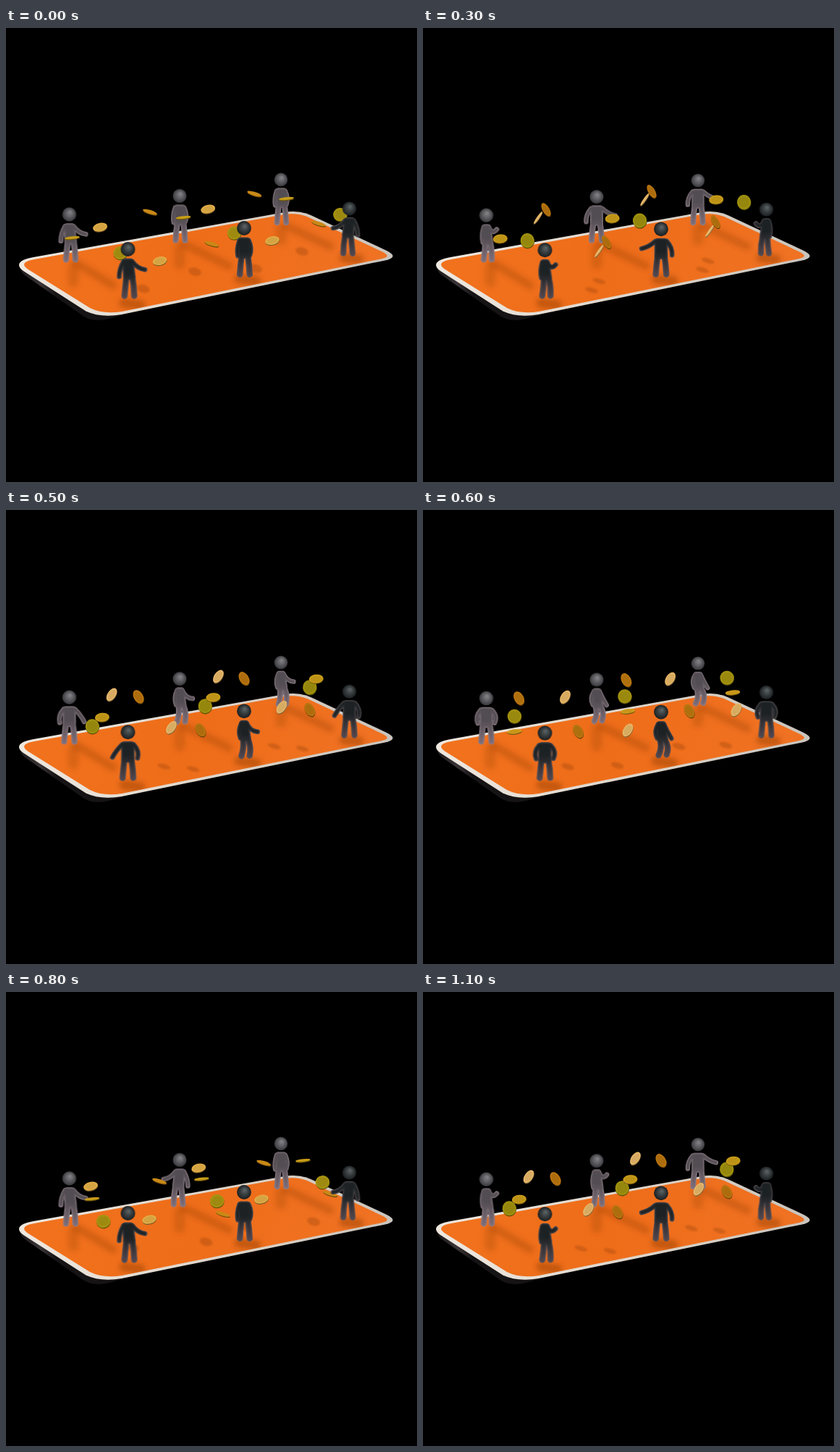
Write an HTML page with a canvas that moves like this. It is 568 px wide and 626 px high and loops after 1200 ms.

```html
<!DOCTYPE html>
<html lang="en">
<head>
<meta charset="utf-8">
<title>Coin exchange</title>
<style>
  html, body { margin: 0; width: 100%; height: 100%; overflow: hidden; background: #000; }
  svg, canvas { position: absolute; left: 0; top: 0; width: 568px; height: 626px; display: block; }
</style>
</head>
<body>
<svg viewBox="0 0 568 626">
  <defs>
    <linearGradient id="top" x1="0" x2="1" y1=".2" y2=".6">
      <stop offset="0" stop-color="#f3741f"/>
      <stop offset=".5" stop-color="#ee6d19"/>
      <stop offset="1" stop-color="#f07325"/>
    </linearGradient>
    <linearGradient id="rim" x1="0" x2="1">
      <stop offset="0" stop-color="#efe8df"/>
      <stop offset=".7" stop-color="#d8cfc4"/>
      <stop offset="1" stop-color="#c9c4bd"/>
    </linearGradient>
    <linearGradient id="side" x1="0" x2="1">
      <stop offset="0" stop-color="#1d1a1b"/>
      <stop offset=".2" stop-color="#3a3436"/>
      <stop offset=".35" stop-color="#161314"/>
    </linearGradient>
    <filter id="soft" x="-30%" y="-30%" width="160%" height="160%"><feGaussianBlur stdDeviation="3.5"/></filter>
    <clipPath id="face">
      <path d="M42,318.5 L385,257 Q402,254.5 416,260 L521,309 Q533,315 520,318 L160,391 Q134,395 116,386 L30,332.5 Q16,322.5 42,318.5Z"/>
    </clipPath>
  </defs>
  <path fill="url(#side)" d="M19.5,324 V332 Q21,338 29,343 L108,398 Q122,406 142,401 L160,396 L60,330Z"/>
  <path fill="url(#rim)" d="M38,316 L385,254 Q405,251 421,258 L526,307 Q544,316 524,320.5 L160,395 Q131,400 110.5,390.5 L24,335 Q7,322 38,316Z"/>
  <g clip-path="url(#face)">
    <rect width="568" height="626" fill="url(#top)"/>
    <g filter="url(#soft)" fill="none" stroke="#8f3b05" stroke-linecap="round">
      <g stroke-width="11" opacity=".3">
        <path d="M97,324 L148,355"/>
        <path d="M246,298 L308,328"/>
        <path d="M388,273 L448,301"/>
      </g>
      <g stroke-width="15" opacity=".25">
        <path d="M93,330 V350"/>
        <path d="M240,303 V325"/>
        <path d="M380,276 V292"/>
      </g>
      <g stroke-width="13" opacity=".45">
        <path d="M163,379 L186,382"/>
        <path d="M322,346 L346,349"/>
        <path d="M467,317 L488,319"/>
      </g>
    </g>
  </g>
</svg>
<canvas id="stage" width="568" height="626"></canvas>
<script>
const ctx = document.getElementById('stage').getContext('2d');
const layer = document.createElement('canvas');
layer.width = 90;
layer.height = 110;
const lc = layer.getContext('2d');

const { sin, cos, abs, PI } = Math;
const mix = (a, b, k) => a + (b - a) * k;
const mixList = (a, b, k) => a.map((v, i) => mix(v, b[i], k));
const rgb = c => `rgb(${c.map(Math.round).join(',')})`;

// Body width, lean, left upper arm and forearm, right upper arm and forearm, knee bend (degrees from down)
const POSES = {
  reach: [.75, 2, -30, 0, 36, 82, 2],
  bent: [.5, 2, -32, 28, 24, 32, 24],
  side: [.45, 2, -18, 14, 22, 140, 6],
  open: [1, 0, -48, -78, 42, -4, 0],
  akimbo: [1, 0, -42, 22, 44, -26, 3],
  turn: [.8, 1, -20, 10, 26, -20, 0]
};
const CUES = [0, 2, 3, 4, 6, 8, 10, 11];

// A leading minus mirrors the pose
function pose(name) {
  if (name[0] !== '-') return POSES[name];
  const [width, lean, lu, lf, ru, rf, bend] = POSES[name.slice(1)];
  return [width, -lean, -ru, -rf, -lu, -lf, -bend];
}

function poseAt(poses, step) {
  const next = CUES.findIndex(c => c >= step);
  if (CUES[next] === step) return poses[next];
  return mixList(poses[next - 1], poses[next], (step - CUES[next - 1]) / (CUES[next] - CUES[next - 1]));
}

// Two-part limb from a root point
function limb(x, y, upper, lower, a, b) {
  const p = upper * PI / 180, q = lower * PI / 180;
  const mx = x + a * sin(p), my = y + a * cos(p);
  return [[x, y], [mx, my], [mx + b * sin(q), my + b * cos(q)]];
}

function skeleton([width, lean, lu, lf, ru, rf, bend], bob) {
  const arm = (side, u, f) => limb(side * 8 * width, 17 + bob, u, f, 12, 10.5);
  const leg = side => limb(lean + side * (2 + 3 * width), 39 + bob * .8,
    bend + side * 8, side * 3 - bend, 13 - bob * .4, 12.5 - bob * .4);
  return { arms: [arm(-1, lu, lf), arm(1, ru, rf)], legs: [leg(-1), leg(1)] };
}

const PALE = { head: ['#807f82', '#5d5c60', '#38373b'], rim: '#94828c', core: ['#524d52', '#7d6c76'] };
const DARK = { head: ['#596061', '#363c3e', '#1a1d1f'], rim: '#5f555b', core: ['#1c2123', '#51464d'] };
const person = (x, y, size, look, names) => ({ x, y, size, look, poses: names.split(' ').map(pose) });

const BACK = [
  person(380, 209, .92, PALE, 'turn akimbo -open side bent turn akimbo -open'),
  person(240, 231.5, .95, PALE, 'turn akimbo -open side bent -reach -bent side'),
  person(87.5, 257, .97, PALE, 'reach bent side -open akimbo reach bent side')
];
const FRONT = [
  person(474.5, 249, .96, DARK, '-reach -bent -side open akimbo -reach -bent -side'),
  person(329, 276, .99, DARK, 'turn akimbo open side bent turn akimbo open'),
  person(168.5, 305, 1, DARK, 'reach bent side open akimbo reach bent side')
];

function drawBody({ arms, legs }, trim, style) {
  lc.lineCap = lc.lineJoin = 'round';
  lc.fillStyle = lc.strokeStyle = style;
  const bend = ([a, b, c], width) => {
    lc.lineWidth = width - trim;
    lc.beginPath();
    lc.moveTo(...a);
    lc.quadraticCurveTo(...b, ...c);
    lc.stroke();
  };
  legs.forEach(l => bend(l, 8.6));
  lc.lineWidth = 9 - trim;
  lc.beginPath();
  arms.forEach(([[x, y]]) => lc.lineTo(x * .6, y));
  [...legs].reverse().forEach(([[x, y]]) => lc.lineTo(x, y - 1));
  lc.closePath();
  lc.fill();
  lc.stroke();
  arms.forEach(a => bend(a, 6.8));
}

function drawPerson({ x, y, size, look, poses }, step) {
  const bob = 1.3 * (1 - cos(step * PI / 2));
  const body = skeleton(poseAt(poses, step), bob);
  lc.setTransform(1, 0, 0, 1, 0, 0);
  lc.clearRect(0, 0, 90, 110);
  lc.setTransform(size, 0, 0, size, 45, 20);
  drawBody(body, 0, look.rim);

  const shade = lc.createLinearGradient(0, 15, 0, 66);
  look.core.forEach((c, i) => shade.addColorStop(mix(.35, 1, i), c));
  lc.globalCompositeOperation = 'source-atop';
  lc.filter = 'blur(1px)';
  drawBody(body, 1.8, shade);
  lc.filter = 'none';
  lc.globalCompositeOperation = 'source-over';

  const ball = lc.createRadialGradient(1, bob - 3, 1, 0, bob, 10.3);
  look.head.forEach((c, i) => ball.addColorStop(i / 2, c));
  lc.fillStyle = ball;
  lc.beginPath();
  lc.arc(0, bob, 10, 0, 7);
  lc.fill();
  ctx.drawImage(layer, x - 45, y - 20);
}

const CREAM = [230, 184, 112], GOLD = [222, 162, 30], RUST = [180, 112, 14], OLIVE = [158, 144, 14];

// Tumbling coins turn with their travel u and catch light when leaning one way
function tumble(u, dir) {
  const tilt = dir * 195 * u;
  const light = -sin(tilt * PI / 90);
  return {
    tilt: tilt + 2,
    ry: dir > 0 ? 4.1 + 2.6 * sin(3.8 * u) : 4.2 + 1.5 * sin(PI * u) ** 2 + 1.6 * u,
    color: mixList(GOLD, light > 0 ? CREAM : RUST, abs(light))
  };
}

// Flipping coins stay level and open and close
function flip(u, dir) {
  const open = abs(cos(3.8 * u * dir - 1.1));
  return { tilt: -6, ry: Math.max(1.4, 10 * open), color: mixList(GOLD, OLIVE, abs(open - .4) / .6) };
}

// Middle of the path, reach along x and y, and the same lane repeated along the board
const lane = (spin, dir, x, y, ax, ay, dx, dy, count, grow) =>
  ({ spin, dir, x, y, ax, ay, dx, dy, count, grow });
const LANES = [
  lane(tumble, 1, 171, 259, 41, -7, 152, -26, 2, -.06),
  lane(tumble, -1, 158, 252, -41, 7, 152, -26, 2, -.06),
  lane(tumble, 1, 256, 305, 43.5, -7.5, 157.5, -29, 2, -.08),
  lane(tumble, -1, 241, 297, -43, 8, 157, -29, 2, -.08),
  lane(flip, 1, 113, 294, 21.5, 13.5, 161, -29, 3, .08),
  lane(flip, -1, 138.5, 289, -19.5, -12.5, 160, -28.5, 3, .16)
];

function eachCoin(step, draw) {
  const p = (step > 8 ? 12 - step : step - 4) / 4;
  const u = p + .12 * sin(PI * p) ** 3;
  for (const l of LANES) {
    for (let i = 0; i < l.count; i++) {
      const shift = i * (1 - .035 * i);
      const x = l.x + l.ax * u * (1 + l.grow * i) + l.dx * shift;
      const y = l.y + l.ay * u + 9 * u * u + l.dy * shift;
      draw(x, y, l, u);
    }
  }
}

function oval(x, y, rx, ry, deg, fill) {
  ctx.beginPath();
  ctx.ellipse(x, y, rx, ry, deg * PI / 180, 0, 7);
  ctx.fillStyle = fill;
  ctx.fill();
}

function drawCoin(x, y, { spin, dir }, u) {
  const { tilt, ry, color } = spin(u, dir);
  const rx = mix(10.5, 9.6, ry / 10);
  oval(x + .3, y + .8, rx, ry, tilt, rgb(color.map(v => v * .55)));
  oval(x, y - .4, rx, ry, tilt, rgb(color));
  if (ry > 3) oval(x, y - .4, rx * .78, ry * .74, tilt, rgb(color.map(v => v * .94)));
}

// Only the coins above the board cast a shadow
function drawShadow(x, y, { spin, x: mid }, u) {
  if (spin !== tumble || mid < 200) return;
  oval(x - mix(9, 23, u * u), y + mix(55, 38, u * u), 9, 3 + 2.5 * u * u, 16, 'rgba(140,60,10,.3)');
}

const start = performance.now();
let shown = -1;
function tick() {
  const step = Math.floor(Math.max(0, performance.now() - start) / 100) % 12;
  if (step !== shown) {
    shown = step;
    ctx.clearRect(0, 0, 568, 626);
    ctx.filter = 'blur(1px)';
    eachCoin(step, drawShadow);
    ctx.filter = 'none';
    BACK.forEach(p => drawPerson(p, step));
    eachCoin(step, drawCoin);
    FRONT.forEach(p => drawPerson(p, step));
  }
  requestAnimationFrame(tick);
}
tick();
</script>
</body>
</html>
```
